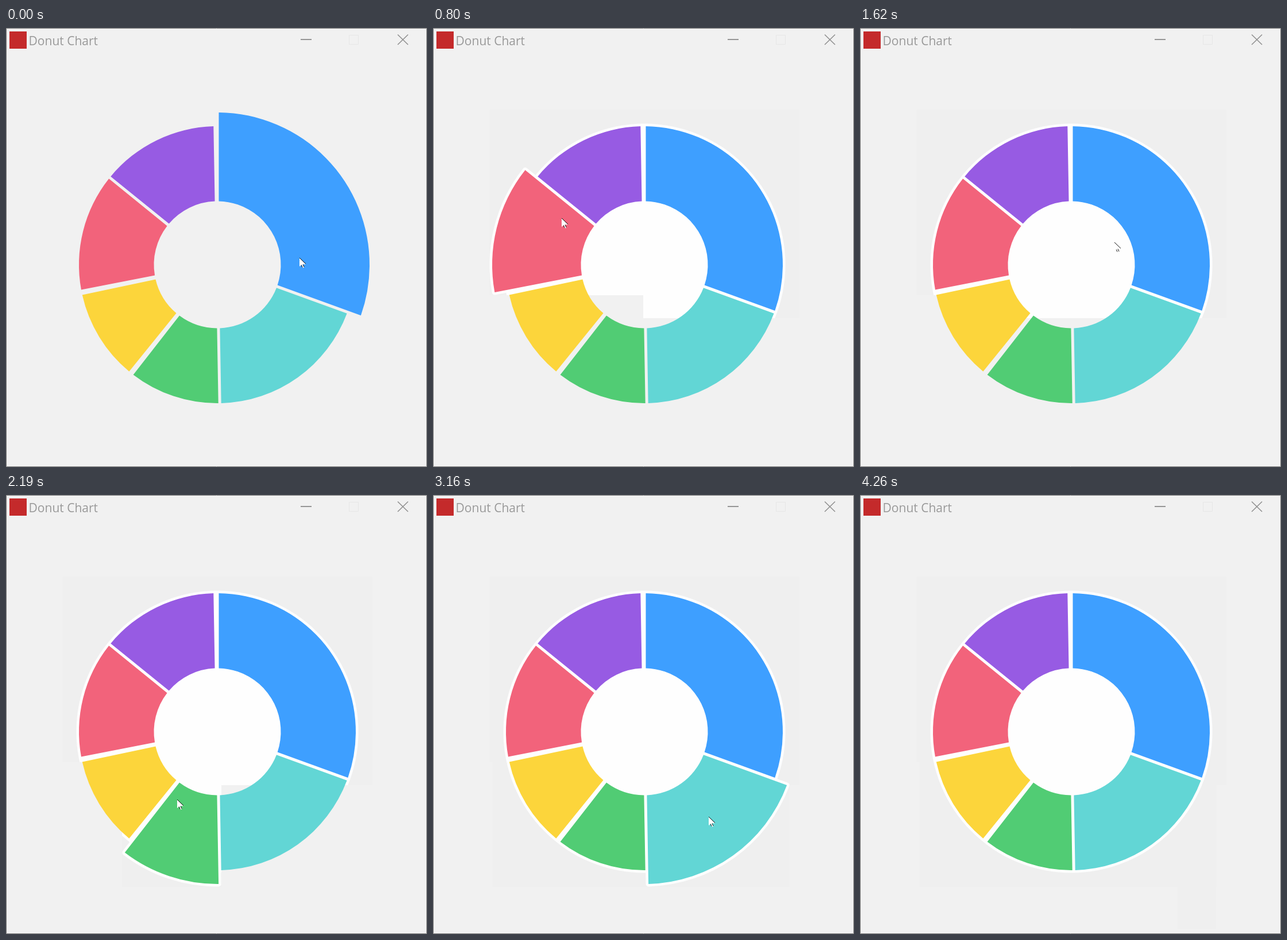
Animation, 733 px wide and 764 px high, one loop 4690 ms. Source, as an HTML page with a canvas:

```html
<!DOCTYPE html>
<html lang="en">
<head>
<meta charset="utf-8">
<title>Donut Chart</title>
<style>
  html, body { margin: 0; width: 100%; height: 100%; overflow: hidden; background: #f1f1f1; }
  canvas { display: block; }
</style>
</head>
<body>
<canvas width="733" height="764"></canvas>
<script>
const ctx = document.querySelector('canvas').getContext('2d');
const LOOP = 4690, FIRST_STEP = 378, STEP = 138, LAST = 29;
const CX = 368, CY = 412, INNER = 110.5, OUTER = 241, POPPED = 265;
const INSET = 2.5, HALO = 4.5, NONE = -1;

// Slices go clockwise from the top; starts and sweeps are cut to whole degrees.
const shares = { '#3e9fff': 110.4, '#62d6d5': 69.2, '#51cc74': 39.6, '#fcd53b': 39.9, '#f2637b': 50.3, '#975be3': 50.6 };
let total = 0;
const slices = Object.entries(shares).map(([color, share]) => {
  const start = Math.floor(total) - 90;
  total += share;
  return { color, start, end: start + Math.floor(share) };
});

// Pointer path: step, x, y; straight and even between these points.
const path = [
  [0, 511, 400], [3, 305, 262], [4, 224, 331], [6, 206, 435], [8, 303, 248], [9, 400, 270],
  [10, 443, 373], [11, 432, 442], [13, 360, 464], [14, 298, 530], [16, 285, 590], [19, 229, 540],
  [20, 360, 600], [21, 480, 560], [23, 430, 430], [24, 375, 375], [26, 468, 456], [27, 553, 664], [28, 609, 737]
];

function pointerAt(step) {
  const i = path.findIndex(point => point[0] >= step);
  if (i < 0) return null;
  const [n1, x1, y1] = path[i], [n0, x0, y0] = path[Math.max(i - 1, 0)];
  const part = (step - n0) / (n1 - n0 || 1);
  return { x: Math.round(x0 + (x1 - x0) * part), y: Math.round(y0 + (y1 - y0) * part) };
}

function sliceAt(point) {
  if (!point) return NONE;
  const dx = point.x - CX, dy = point.y - CY, radius = Math.hypot(dx, dy);
  if (radius < INNER || radius > OUTER) return NONE;
  const angle = (Math.atan2(dy, dx) * 180 / Math.PI + 450) % 360 - 90;
  return slices.findIndex(s => angle >= s.start && angle < s.end);
}

// Angles in radians at a given radius, leaving a gap of even width.
function span({ start, end }, radius) {
  const gap = Math.asin(INSET / radius), rad = Math.PI / 180;
  return [start * rad + gap, end * rad - gap];
}

function sliceCorners(index) {
  const points = [];
  for (const radius of [INNER, POPPED]) {
    const [from, to] = span(slices[index], radius);
    for (let i = 0; i <= 20; i++) {
      const angle = from + (to - from) * i / 20;
      const x = CX + radius * Math.cos(angle), y = CY + radius * Math.sin(angle);
      points.push([x - 5, y - 5], [x + 5, y + 5]);
    }
  }
  return points;
}

// Box around everything that differs between two states.
function changedArea(a, b) {
  const points = [];
  for (const { pointer, raised } of [a, b]) {
    if (pointer) points.push([pointer.x, pointer.y], [pointer.x + 11, pointer.y + 18]);
    if (a.raised !== b.raised && raised !== NONE) points.push(...sliceCorners(raised));
  }
  const xs = points.map(p => p[0]), ys = points.map(p => p[1]);
  const left = Math.round(Math.min(...xs)), top = Math.round(Math.min(...ys));
  return [left, top, Math.round(Math.max(...xs)) - left, Math.round(Math.max(...ys)) - top];
}

const states = [];
for (let step = 0; step <= LAST; step++) {
  const pointer = pointerAt(step), last = states[step - 1];
  const state = { pointer, raised: sliceAt(pointer), areas: [] };
  if (last) state.areas = [...last.areas, changedArea(last, state)];
  states.push(state);
}

function slicePath(index, radius) {
  ctx.beginPath();
  ctx.arc(CX, CY, radius, ...span(slices[index], radius));
  ctx.arc(CX, CY, INNER, ...span(slices[index], INNER).reverse(), true);
  ctx.closePath();
}

function stroke(shape, color, width) {
  ctx.strokeStyle = color;
  ctx.lineWidth = width;
  ctx.stroke(new Path2D(shape));
}

function drawWindow() {
  ctx.fillStyle = '#f1f1f1';
  ctx.fillRect(0, 0, 733, 764);
  ctx.fillStyle = '#c42a2b';
  ctx.fillRect(6, 6, 30, 30);
  ctx.fillStyle = '#999';
  ctx.font = '21px "Open Sans", "Noto Sans", sans-serif';
  ctx.fillText('Donut Chart', 39.5, 30);
  stroke('M513 20H532', '#969696', 2);
  stroke('M682 11.5L700 29M700 11.5L682 29', '#909090', 1.6);
  stroke('M597.5 12.5h16v16h-16z', '#e7e7e7', 1);
  stroke('M.5 .5h732v763h-732z', '#6c6c6c', 1);
}

// Repainted areas are slightly darker, with a white backing behind the chart.
function drawBacking({ areas, raised }) {
  ctx.save();
  ctx.beginPath();
  areas.forEach(area => ctx.rect(...area));
  ctx.clip();
  ctx.fillStyle = '#efefef';
  ctx.fillRect(0, 0, 733, 764);
  ctx.fillStyle = ctx.strokeStyle = '#fefefe';
  ctx.beginPath();
  ctx.arc(CX, CY, OUTER + HALO, 0, 7);
  ctx.fill();
  if (raised !== NONE) {
    slicePath(raised, POPPED);
    ctx.lineWidth = 2 * HALO;
    ctx.lineJoin = 'round';
    ctx.stroke();
  }
  ctx.restore();
}

function drawPointer({ x, y }) {
  ctx.save();
  ctx.translate(x, y);
  ctx.fillStyle = '#fff';
  ctx.fill(new Path2D('M0 0V15L3.5 12 6 17.5 8.3 16.5 6 11.3H11Z'));
  stroke('M0 0L11 10.5M3.3 12.5L5 16.5M6 11.5L8 16', '#111', 1);
  ctx.restore();
}

function draw(time) {
  const step = Math.floor((time - FIRST_STEP) / STEP) + 1;
  const state = states[Math.min(Math.max(step, 0), LAST)];
  drawWindow();
  drawBacking(state);
  slices.forEach(({ color }, i) => {
    slicePath(i, i === state.raised ? POPPED : OUTER);
    ctx.fillStyle = color;
    ctx.fill();
  });
  if (state.pointer) drawPointer(state.pointer);
}

const begin = performance.now();
function tick() {
  draw((performance.now() - begin) % LOOP);
  requestAnimationFrame(tick);
}
tick();
</script>
</body>
</html>
```
